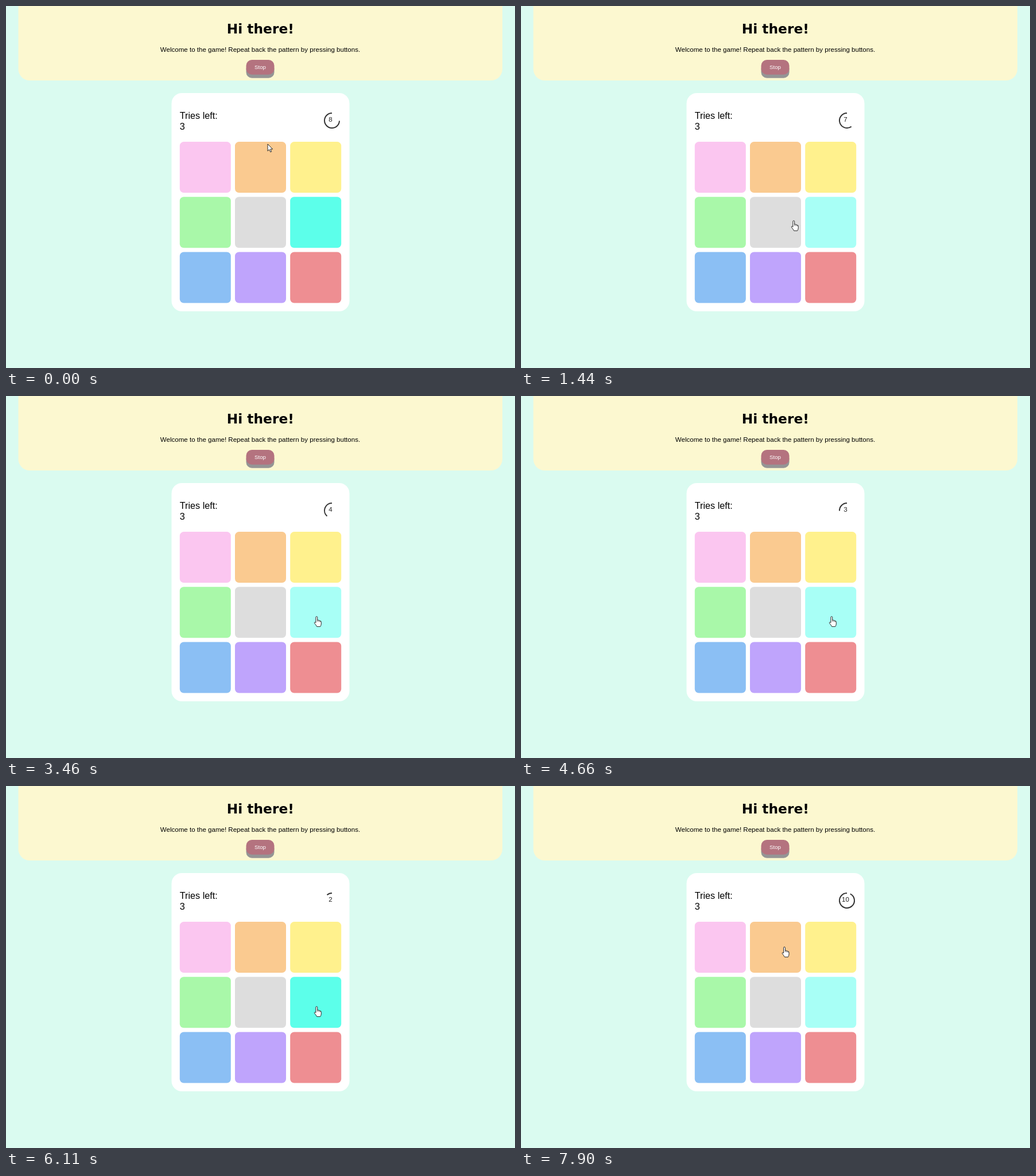
Animation of 887x632 px, one loop 8 s. Source, as an HTML page:

```html
<!DOCTYPE html>
<html lang="en">
<head>
<meta charset="utf-8">
<title>Pattern game</title>
<style>
  html, body { margin: 0; width: 100%; height: 100%; overflow: hidden; background: #dafbf0; }
  svg { display: block; width: 887px; height: 632px; font-family: "Liberation Sans", Arial, sans-serif; }
  .title { font: bold 23.3px "DejaVu Sans", Verdana, sans-serif; }
  .mid { text-anchor: middle; }
  .body { font-size: 11.56px; }
  .tries { font-size: 16.2px; }
  .stop { font-size: 9.64px; fill: #fff; }
  .cursor { fill: #fff; stroke: #111; stroke-width: .9; stroke-linejoin: round; }
</style>
</head>
<body>
<svg viewBox="0 0 887 632">
  <rect x="21.5" y="-40" width="843.5" height="170" rx="20" fill="#fcf8d0"/>
  <text class="title mid" x="443.3" y="48">Hi there!</text>
  <text class="body mid" x="443" y="79.5">Welcome to the game! Repeat back the pattern by pressing buttons.</text>
  <rect x="418.5" y="100" width="49" height="25.7" rx="10" fill="#959595"/>
  <rect x="418.5" y="94" width="49" height="25.7" rx="10" fill="#b4737f"/>
  <text class="stop mid" x="443" y="110">Stop</text>

  <rect x="288.5" y="152" width="310" height="381" rx="18" fill="#fff"/>
  <text class="tries" x="302.8" y="197">Tries left:</text>
  <text class="tries" x="302.8" y="215.7">3</text>
  <path id="ring" fill="none" stroke="#333" stroke-width="2"/>
  <text id="count" class="body mid" x="565.5" y="202" fill="#222"></text>
  <g id="cells"></g>

  <path id="arrow" class="cursor" d="M0 0V12.2L2.8 9.6L4.8 14L6.7 13.2L4.8 8.9H8.7Z"/>
  <g id="hand" class="cursor">
    <path d="M-1.4 10.5V1.4a1.4 1.4 0 0 1 2.8 0V6.3q2-.8 2.5.8q2-.6 2.4.8q1.7-.2 1.7 1.4V13q-.2 2.6-1.6 4.6H.4Q-1 14.8-3.7 11.6q-.6-1.6.6-1.8q1-.1 1.7 1.1Z"/>
    <path d="M1.4 6.3V9M3.9 7.1V9.4M6.3 7.9V9.8" stroke-width=".7"/>
  </g>
</svg>
<script>
  const LOOP = 8000, TICK = 137, COUNTDOWN = 9550, ELAPSED = 2440;
  const COLORS = ['#fbc6f0', '#faca90', '#fff18d', '#a9f8a9', '#ddd', '#a8fff6', '#8bbff4', '#bfa4fc', '#ee8e92'];
  const ORANGE = 1, CYAN = 5;
  const LIT = { [ORANGE]: '#f8a035', [CYAN]: '#5cffea' };

  // cell, start, end
  const FLASHES = [
    [CYAN, 0, 280], [CYAN, 2100, 2500],
    [CYAN, 3600, 4300], [ORANGE, 4900, 5650],
    [CYAN, 5950, 6350], [ORANGE, 7150, 7550]
  ];
  // time, x, y of the cursor tip
  const PATH = [
    [0, 456, 241], [350, 440, 275], [800, 424, 340], [1140, 429, 366], [1440, 489.3, 377.5],
    [1900, 541.3, 385], [6380, 541.3, 385], [6620, 513, 351], [6900, 459, 281], [LOOP, 459, 281]
  ];

  const $ = id => document.getElementById(id);
  const cells = COLORS.map((color, i) => {
    const rect = document.createElementNS('http://www.w3.org/2000/svg', 'rect');
    const attrs = { x: 302.8 + i % 3 * 96.2, y: 237.1 + Math.floor(i / 3) * 96.2, width: 89, height: 89, rx: 7, fill: color };
    for (const k in attrs) rect.setAttribute(k, attrs[k]);
    return $('cells').appendChild(rect);
  });

  function cursorAt(t) {
    const i = PATH.findIndex(p => p[0] > t);
    const [t0, x0, y0] = PATH[i - 1], [t1, x1, y1] = PATH[i];
    const k = (t - t0) / (t1 - t0);
    return [x0 + (x1 - x0) * k, y0 + (y1 - y0) * k];
  }

  function drawTimer(t) {
    const used = (t + ELAPSED) % COUNTDOWN / COUNTDOWN;
    const a = Math.max(used, .001) * 2 * Math.PI;
    const x = 568 + 13 * Math.sin(a), y = 200 - 13 * Math.cos(a);
    $('ring').setAttribute('d', `M${x} ${y}A13 13 0 ${+(used < .5)} 1 568 187`);
    $('count').textContent = Math.ceil(10 * (1 - used));
  }

  function draw(now) {
    const time = now % LOOP;
    const t = Math.floor(time / TICK) * TICK;
    drawTimer(t);
    for (const i of [ORANGE, CYAN]) {
      const on = FLASHES.some(([cell, start, end]) => cell === i && t >= start && t < end);
      cells[i].setAttribute('fill', on ? LIT[i] : COLORS[i]);
    }
    const place = `translate(${cursorAt(t)})`;
    const isArrow = t < 150;
    for (const id of ['arrow', 'hand']) {
      $(id).setAttribute('transform', place);
      $(id).style.display = (id === 'arrow') === isArrow ? '' : 'none';
    }
    requestAnimationFrame(() => draw(performance.now()));
  }
  draw(0);
</script>
</body>
</html>
```
